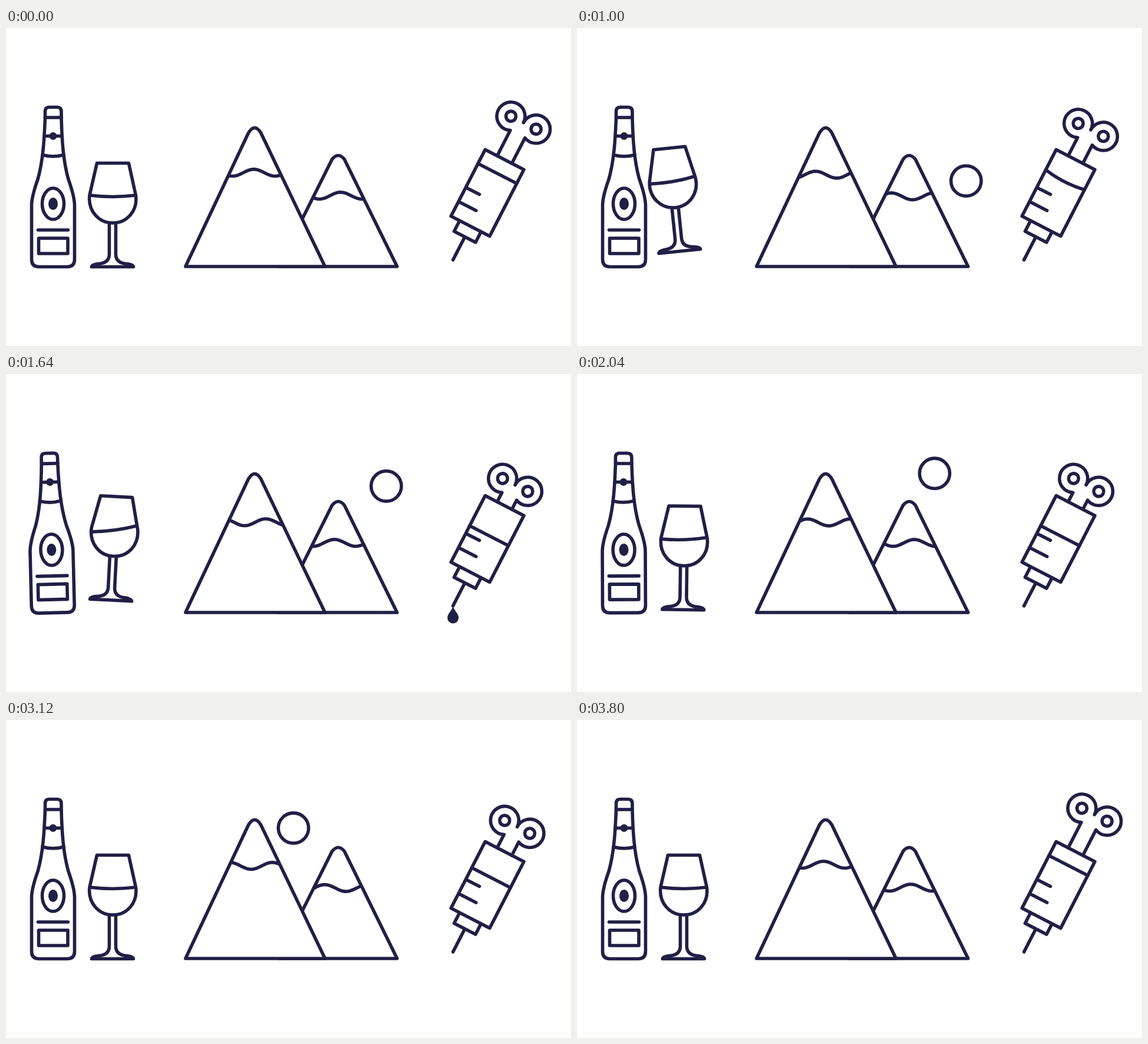
Write an HTML page that moves like this. It is 960 px wide and 540 px high and loops after 3840 ms.

```html
<!DOCTYPE html>
<html lang="en">
<head>
<meta charset="utf-8">
<title>Line icons</title>
<style>
  html, body { margin: 0; width: 100%; height: 100%; overflow: hidden; background: #fff; }
  svg { display: block; width: 960px; height: 540px; fill: none; stroke: #201f45; stroke-width: 5.6; stroke-linecap: round; stroke-linejoin: round; }
  .solid { fill: #201f45; stroke: none; }
  .cover { fill: #fff; }
</style>
</head>
<body>
<svg viewBox="0 0 960 540">
  <defs>
    <path id="bigPeak" d="M305 405L412 178Q422.500 161 433 178L542 405Z"/>
    <path id="smallPeak" d="M463 405L554 223Q564.500 210 575 223L664.500 405Z"/>
    <path id="bowl" d="M154.500 229.500H208.500L220.500 284C224 310 206 331 181.500 331C157 331 139 310 142 284Z"/>
    <path id="orbit" d="M594 347C628 320 662 290 661.500 252C661 180 630 163 558 166.500C510 168 455 195 421 228"/>
    <clipPath id="bigClip"><use href="#bigPeak"/></clipPath>
    <clipPath id="smallClip"><use href="#smallPeak"/></clipPath>
    <clipPath id="bowlClip"><use href="#bowl"/></clipPath>
  </defs>

  <g id="bottle">
    <path d="M66.500 152V142Q66.500 134.500 73 134.500H87Q94 134.500 94 142V152C95 190 97 225 106 257Q116 285 116.500 300V393Q116.500 405.500 104 405.500H56Q43.500 405.500 43.500 393V300Q44 285 54 257C63 225 65 190 66.500 152Z"/>
    <path d="M66.500 152H94M65 183.500H95M62 215.500Q80 220.500 98 215.500M54.500 343H105.500M55.500 357H105V383H55.500Z"/>
    <circle class="solid" cx="80" cy="183.500" r="6.500"/>
    <ellipse cx="80" cy="298.500" rx="18.500" ry="26.500"/>
    <ellipse class="solid" cx="80" cy="298.500" rx="8" ry="10.500"/>
  </g>

  <g id="glass">
    <use href="#bowl"/>
    <path id="wine" clip-path="url(#bowlClip)"/>
    <path d="M175.500 332V384Q175.500 398 160 400Q146 401 145.500 405.500H216.500Q216 401 202 400Q186.500 398 186.500 384V332"/>
  </g>

  <circle id="sun" r="25.700"/>
  <use href="#smallPeak" class="cover"/>
  <path id="smallSnow" clip-path="url(#smallClip)"/>
  <use href="#bigPeak" class="cover"/>
  <path id="bigSnow" clip-path="url(#bigClip)"/>

  <g transform="translate(818 280) rotate(27.2)">
    <path d="M-37-63.500H37V63.500H-37ZM-20.500 63.500V84H20.500V63.500M0 84V128M-37 8.500H-11M-37 35.500H-3.500"/>
    <path id="plunger"/>
    <path id="fluid"/>
  </g>
  <path id="drop" class="solid" d="M0 0C2 8 9.500 13 9.500 20A9.500 9.500 0 0 1-9.500 20C-9.500 13-2 8 0 0Z"/>
</svg>
<script>
const LOOP = 3840, HIT = 1130;
const $ = id => document.getElementById(id);
const place = (id, transform) => $(id).setAttribute("transform", transform);
const trace = (id, d) => $(id).setAttribute("d", d);

// Progress from 0 to 1 between two times, linear or eased at both ends.
const linear = (t, start, end) => Math.max(0, Math.min(1, (t - start) / (end - start)));
const eased = (t, start, end) => {
  const p = linear(t, start, end);
  return p * p * (3 - 2 * p);
};

function wave(from, to, peak, y) {
  let d = "";
  for (let x = from; x <= to; x += 2)
    d += `${d ? "L" : "M"}${x} ${(y - 5.8 * Math.cos((x - peak) * Math.PI / 36)).toFixed(2)}`;
  return d;
}

function drawMountains(t) {
  const turn = t / LOOP, bob = 1 - Math.cos(turn * 2 * Math.PI);
  trace("bigSnow", wave(360, 486, 421 + 216 * turn, 245.7 + 3.2 * bob));
  trace("smallSnow", wave(506, 624, 568.5 + 144 * turn, 284.7 + 1.1 * bob));
  const sun = $("orbit").getPointAtLength(turn * $("orbit").getTotalLength());
  place("sun", `translate(${sun.x} ${sun.y})`);
}

// The glass is lifted, swings into the bottle and is set down again.
function drawToast(t) {
  const lift = eased(t, 240, 900) - eased(t, 1400, 2300);
  const swing = t < HIT ? linear(t, 640, HIT) ** 1.5 : 1 - eased(t, HIT, 1640);
  place("glass", `translate(${2 * lift - 28 * swing} ${-26 * lift}) rotate(${3.6 * lift - 15 * swing} 181.5 317)`);
  const slosh = 9 * lift - 10 * swing;
  trace("wine", `M142 ${284 + slosh}Q181.500 289 221 ${284 - slosh}`);
  const recoil = eased(t, HIT, 1360) * (1 - linear(t, 1360, 2320)) ** 2;
  place("bottle", `rotate(${-2.8 * recoil} 80 405)`);
}

function drawSyringe(t) {
  const press = linear(t, 198, 1484);
  const push = 31 * (1 - Math.cos(press * Math.PI / 2) - eased(t, 2860, 3660));
  const sag = 4 * Math.sin(press * Math.PI) ** 2;
  const ringY = push - 134, rodY = ringY + 21.8, level = push - 37;
  const hole = x => `M${x - 8.5} ${ringY}a8.500 8.500 0 1 1 17 0a8.500 8.500 0 1 1-17 0`;
  trace("plunger", `M-14-63.500V${rodY}A24 24 0 1 1 0 ${ringY}A24 24 0 1 1 14 ${rodY}V-63.500` + hole(-24) + hole(24));
  trace("fluid", `M-37 ${level - sag / 2}Q0 ${level + 1.5 * sag} 37 ${level - sag / 2}`);

  const grow = linear(t, 1240, 1600), fall = linear(t, 1640, 2000);
  const shrink = Math.min(1, 4 * (1 - fall));
  place("drop", `translate(759.5 ${394 + 80 * fall * fall + 20 * (1 - shrink)}) scale(${grow * shrink})`);
}

function tick() {
  const t = performance.now() % LOOP;
  drawMountains(t);
  drawToast(t);
  drawSyringe(t);
  requestAnimationFrame(tick);
}
tick();
</script>
</body>
</html>
```
